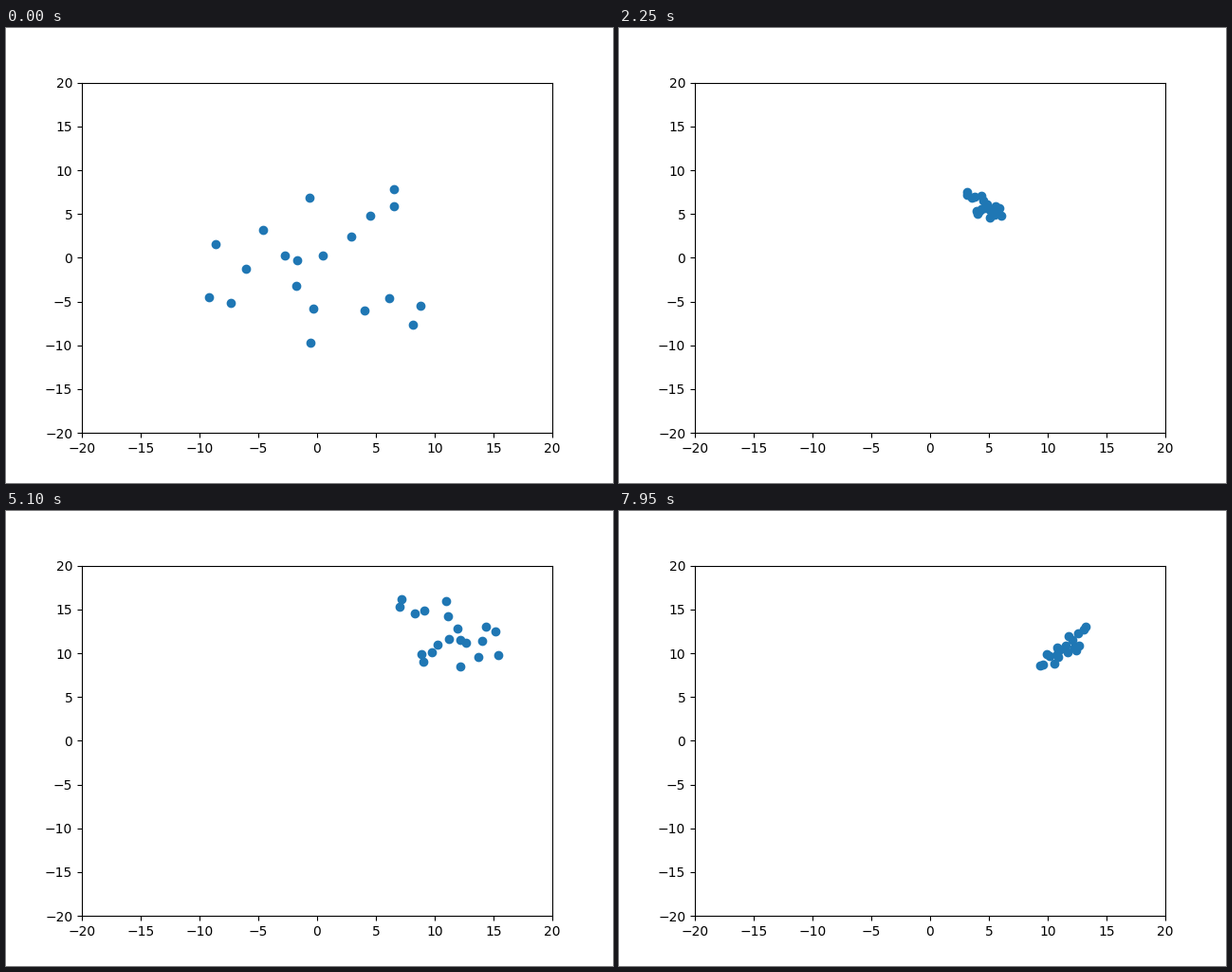
Animation of 640 by 480 pixels, one loop 8000 ms. Source, as a matplotlib script:

```python
import numpy as np
import matplotlib.pyplot as plt
from matplotlib.animation import FuncAnimation

W, H, DPI = 640, 480, 100
INTERVAL, FRAMES, HOLD = 50, 160, 3  # the swarm advances every third frame
LIMIT = 20

# Where the particles start, in stage pixels.
START = np.array([
    (409, 170), (409, 188), (384, 198), (364, 220), (320, 179),
    (271, 213), (221, 228), (253, 254), (294, 240), (307, 245),
    (334, 240), (306, 272), (214, 284), (237, 290), (324, 296),
    (321, 332), (378, 298), (404, 285), (437, 293), (429, 313),
], float)

# Step, swarm centre x and y, spread (negative once the particles have crossed).
KEYS = np.array([
    (0, 331, 252, 1.00),
    (6, 347, 235, 0.68),
    (15, 385, 188, -0.15),
    (26, 437, 145, -0.54),
    (34, 467, 130, -0.45),
    (39, 476, 128, -0.26),
    (53, 469, 145, 0.19),
])
LEAN, LEAN_STEPS = -0.1, 26  # the swarm gradually tilts along the diagonal


def spline_slopes(knots, points):
    """Slopes of a cubic spline that starts at rest and ends uncurved."""
    n = len(knots)
    gaps = np.diff(knots)
    rates = np.diff(points, axis=0) / gaps[:, None]
    matrix, rhs = np.eye(n), np.zeros_like(points)
    for i in range(1, n - 1):
        a, b = 1 / gaps[i - 1], 1 / gaps[i]
        matrix[i, i - 1:i + 2] = a, 2 * (a + b), b
        rhs[i] = 3 * (a * rates[i - 1] + b * rates[i])
    matrix[-1, -2:] = 1, 2
    rhs[-1] = 3 * rates[-1]
    return np.linalg.solve(matrix, rhs)


knots, points = KEYS[:, 0], KEYS[:, 1:]
slopes = spline_slopes(knots, points)


def glide(step):
    """Swarm centre and spread on the spline through the keys."""
    i = min(np.searchsorted(knots, step, side="right") - 1, len(knots) - 2)
    gap = knots[i + 1] - knots[i]
    t = (step - knots[i]) / gap
    return ((1 + 2 * t) * (1 - t) ** 2 * points[i]
            + t * (1 - t) ** 2 * gap * slopes[i]
            + t * t * (3 - 2 * t) * points[i + 1]
            + t * t * (t - 1) * gap * slopes[i + 1])


def to_data(pixels):
    """Convert stage pixels to axes data, using the default subplot margins."""
    x = (pixels[:, 0] - 0.125 * W) / (0.775 * W)
    y = (0.89 * H - pixels[:, 1]) / (0.77 * H)
    return (2 * x - 1) * LIMIT, (2 * y - 1) * LIMIT


def swarm(step):
    cx, cy, spread = glide(step)
    lean = LEAN * min(step / LEAN_STEPS, 1)
    offsets = START - points[0, :2]
    return to_data((cx, cy) + spread * offsets + lean * offsets[:, ::-1])


fig, ax = plt.subplots(figsize=(W / DPI, H / DPI), dpi=DPI)
ax.set_xlim(-LIMIT, LIMIT)
ax.set_ylim(-LIMIT, LIMIT)
dots, = ax.plot(*swarm(0), "o", color="C0")


def update(frame):
    dots.set_data(*swarm(frame // HOLD))
    return dots,


anim = FuncAnimation(fig, update, frames=FRAMES, interval=INTERVAL,
                     repeat=True, repeat_delay=0)
plt.show()
```
